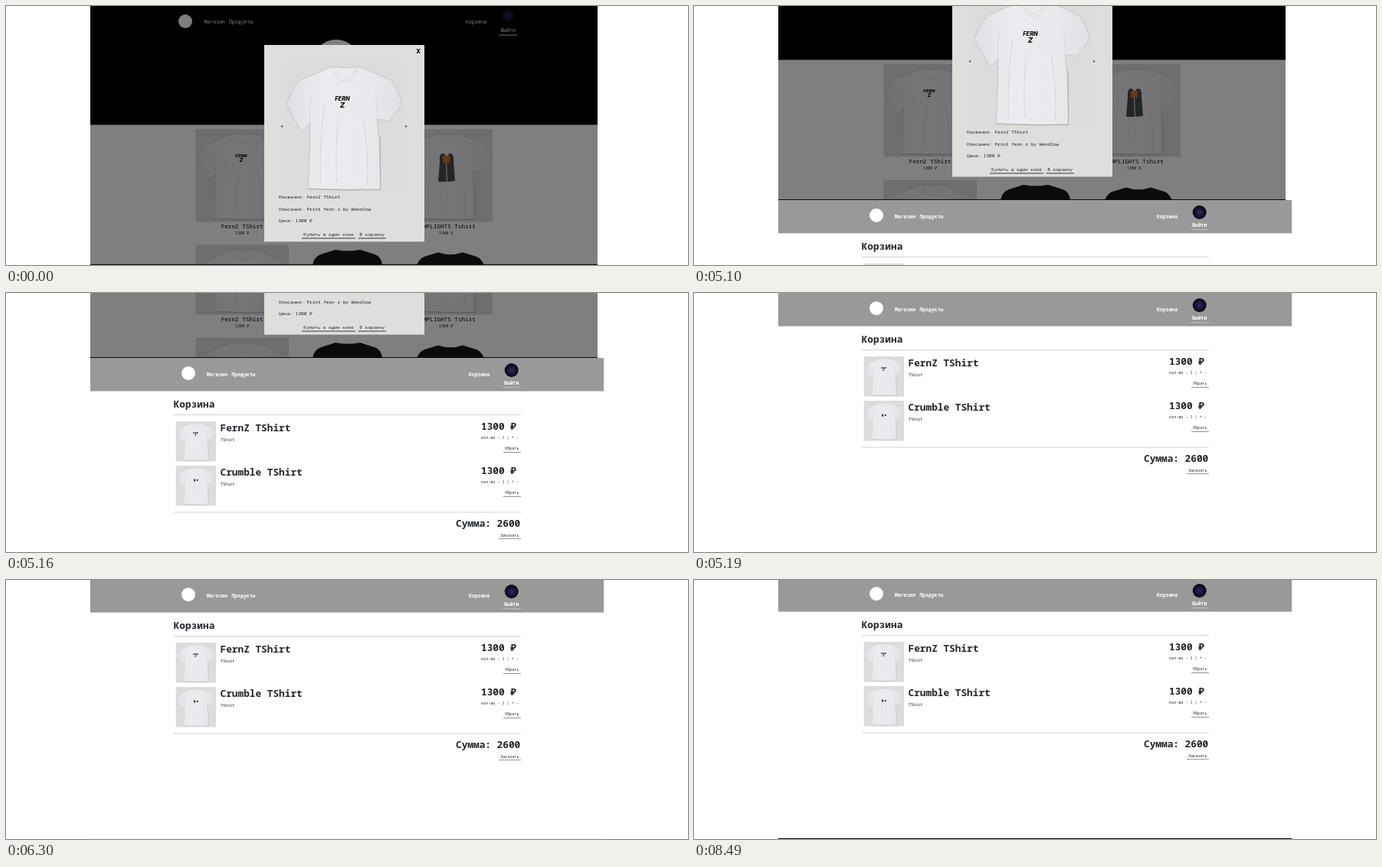
Write an HTML page that moves like this. It is 890 px wide and 339 px high and loops after 9.57 s.

```html
<!DOCTYPE html>
<html lang="ru">
<head>
<meta charset="utf-8">
<title>Магазин</title>
<style>
html, body { margin: 0; width: 100%; height: 100%; overflow: hidden; background: #fff; }
svg { display: block; width: 890px; height: 339px; }
text { font-family: "Noto Sans Mono", monospace; font-size: 6.07px; fill: #1d2124; white-space: pre; }
.nav text { font-size: 6.45px; fill: #fff; }
.bold text { font-weight: 600; }
.card { font-size: 7.63px; fill: #000; }
.big { font-size: 12.77px; font-weight: 600; fill: #212529; }
.small { font-size: 5.1px; }
.print, .close { font: italic 800 7.4px Inter, sans-serif; fill: #0b0b0d; text-anchor: middle; }
.close { font-style: normal; }
.rule { fill: #d3d3d4; }
.under { fill: #777; }
#strip { animation: scroll 9570ms step-end infinite; }
@keyframes scroll {
  0% { transform: translateY(0); }
  53.291% { transform: translateY(-85px); }
  53.604% { transform: translateY(-170px); }
  53.918% { transform: translateY(-254px); }
  54.231% { transform: translateY(-339px); }
  65.83% { transform: translateY(-340px); }
  88.714% { transform: translateY(-341px); }
}
</style>
</head>
<body>
<svg viewBox="0 0 890 339">
  <defs>
    <linearGradient id="cloth">
      <stop offset="0" stop-color="#dfdfe4"/>
      <stop offset=".3" stop-color="#ebebf0"/>
      <stop offset=".7" stop-color="#e9e9ee"/>
      <stop offset="1" stop-color="#e0e0e4"/>
    </linearGradient>
    <radialGradient id="face">
      <stop offset="0" stop-color="#352a68"/>
      <stop offset=".5" stop-color="#1c1638"/>
      <stop offset="1" stop-color="#07060d"/>
    </radialGradient>
    <g id="tee">
      <rect width="154.5" height="175" fill="#dbdcdb"/>
      <path d="M63 9Q40 19 20 27Q9 40 2.5 58Q12 78 23 95L33 84Q33 130 30.5 169Q78 171 125 170Q125 120 121 78L136 81Q147 70 153 57Q148 40 140 28Q118 17 96 9Q79 13 63 9Z"
        fill="url(#cloth)" stroke="#bdbab4" stroke-width=".7"/>
      <path d="M63 9Q66 28 79 29Q93 28 96 9M66 10Q70 24 79 25Q90 24 93 10" fill="none" stroke="#cfcfd4" stroke-width=".8"/>
      <path d="M33 84Q32 62 35 48M121 78Q122 60 118 46M52 60Q45 110 47 162M103 80Q110 125 108 165M70 75Q66 120 68 160" fill="none" stroke="#d6d6dc" stroke-width="1"/>
      <path d="M31 169.5Q78 171.500 125 170.500V100" fill="none" stroke="#a9a59b" stroke-width=".8"/>
    </g>
    <g id="printed">
      <use href="#tee"/>
      <text class="print" x="75.500" y="54">FERN</text>
      <text class="print" x="75.500" y="62.500" style="font-size:9.500px">Z</text>
    </g>
    <g id="price">
      <text class="big" x="620" y="93.500">1300 ₽</text>
      <text class="small" x="620" y="105.800">кол-во - 1 | + -</text>
      <text class="small" x="651" y="120.300">Убрать</text>
      <rect class="under" x="649" y="123" width="23" height=".8"/>
      <text class="small" x="280" y="108.800">TShirt</text>
    </g>
  </defs>

  <g id="strip">
    <g id="shop">
      <rect x="110" width="662" height="339" fill="#fff"/>
      <rect x="110" width="662" height="155.500"/>
      <g class="nav">
        <circle cx="234" cy="20" r="9" fill="#fff"/>
        <text x="258.700" y="22.900">Магазин</text>
        <text x="291" y="22.900">Продукты</text>
        <text x="600" y="22.900">Корзина</text>
        <circle cx="655" cy="13" r="9" fill="url(#face)"/>
        <text x="645.500" y="34.200">Выйти</text>
        <rect x="643.500" y="37.600" width="23.500" height=".9" fill="#fff"/>
      </g>
      <circle cx="431" cy="75" r="31" fill="#fff"/>

      <use href="#printed" transform="translate(247.500 161) scale(.787 .694)"/>
      <text class="card" x="280.700" y="290.800">FernZ TShirt</text>
      <text class="small" x="299" y="298.800">1300 ₽</text>

      <use href="#tee" transform="translate(513.500 161) scale(.787 .694)"/>
      <path d="M564 230L566 204Q565 193 570 193Q575 193 574 202L575 230ZM576 230L575 203Q575 193 580 193Q585 194 584 203L586 229Z" fill="#4b4b4b"/>
      <rect x="570" y="196" width="9" height="9" fill="#c87035"/>
      <text class="card" x="535" y="290.800">LAMPLIGHTS Tshirt</text>
      <text class="small" x="565" y="298.800">1300 ₽</text>

      <use href="#tee" transform="translate(247.500 312.500) scale(.787 .694)"/>
      <path d="M400 339Q402 328 411 325L430 319Q446 322 462 319L481 325Q490 328 491 339ZM536 339Q539 331 546 328L564 322.500Q580 328 596 322.500L614 328Q621 331 624 339Z" fill="#171717"/>
      <rect x="110" width="662" height="339" opacity=".5"/>
      <rect x="110" y="338" width="662" height="1" fill="#0c060a"/>

      <g id="dialog">
        <rect x="337" y="51" width="209" height="257.500" fill="#e0dedd"/>
        <text class="close" x="538" y="61.800">X</text>
        <use href="#printed" x="363.500" y="70"/>
        <text x="358.300" y="160.200" font-weight="600">&lt;</text>
        <text x="520.200" y="160.200" font-weight="600">&gt;</text>
        <text x="356" y="251.900">Названия: FernZ TShirt</text>
        <text x="356" y="267.500">Описания: Print fern z by Wendlow</text>
        <text x="356" y="283">Цена: 1300 ₽</text>
        <text x="388.300" y="300.700">Купить в один клик</text>
        <text x="461.300" y="300.700">В корзину</text>
        <path d="M386 304H456M459.500 304H496" stroke="#222" stroke-width=".9"/>
      </g>
    </g>

    <g id="cart" transform="translate(0 339)">
      <rect width="890" height="342" fill="#fff"/>
      <rect x="110" width="670" height="43.500" fill="#999"/>
      <g class="nav bold">
        <circle cx="238" cy="20" r="9" fill="#fff"/>
        <text x="262" y="23.900">Магазин</text>
        <text x="294.500" y="23.900">Продукты</text>
        <text x="604" y="23.900">Корзина</text>
        <circle cx="659.700" cy="16" r="9" fill="url(#face)"/>
        <text x="650" y="34.900">Выйти</text>
        <rect x="648" y="38.300" width="24" height=".8" fill="#ccc"/>
      </g>
      <text class="big" x="218.700" y="65">Корзина</text>
      <rect class="rule" x="219" y="74" width="453" height="1"/>

      <use href="#printed" transform="translate(221.700 83) scale(.339 .3)"/>
      <text class="big" x="279.500" y="96">FernZ TShirt</text>
      <use href="#price"/>

      <use href="#tee" transform="translate(221.700 141) scale(.339 .3)"/>
      <path d="M244.800 158.500h1.800l.4 3.200h-1.600ZM248.300 159.200h3l-.6 1.500h-2Z" fill="#222"/>
      <text class="big" x="279.500" y="154">Crumble TShirt</text>
      <use href="#price" y="58"/>

      <rect class="rule" x="219" y="201.500" width="453" height="1"/>
      <text class="big" x="587" y="221">Сумма: 2600</text>
      <text class="small" x="645" y="233.800">Заказать</text>
      <rect class="under" x="643" y="236.300" width="29" height=".8"/>
      <rect x="110" y="339" width="670" height="1" fill="#f3f3f3"/>
      <rect x="110" y="340" width="670" height="1" fill="#0c060a"/>
    </g>
  </g>
</svg>
</body>
</html>
```
